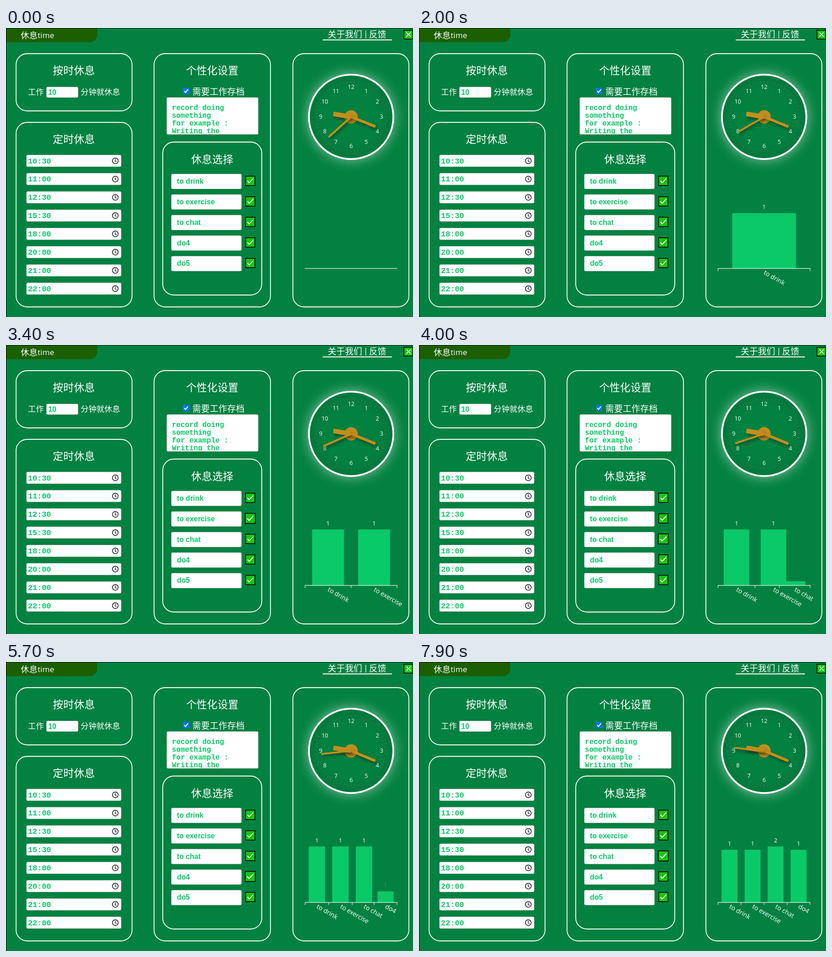
An HTML page with a canvas that plays this animation: 888 by 631 pixels, repeating every 8000 ms.

```html
<!DOCTYPE html>
<html lang="zh">
<head>
<meta charset="utf-8">
<title>休息time</title>
<style>
  html, body { margin: 0; width: 100%; height: 100%; overflow: hidden; background: #028140; }
  canvas { display: block; }
</style>
</head>
<body>
<canvas id="stage" width="888" height="631"></canvas>
<script>
const ctx = document.getElementById('stage').getContext('2d');
const LOOP = 8000, STEP = 100;
const BG = '#028140', WHITE = '#fff', MINT = '#0ac968', LIME = '#17c50f', GOLD = '#c18f1e';
const CJK = '"Noto Sans CJK SC", "Noto Sans CJK", sans-serif';
const LATIN = '"Open Sans", "Noto Sans", sans-serif';
const ARIAL = '"Liberation Sans", Arial, sans-serif';
const MONO = '"Liberation Mono", monospace';

const clamp = x => Math.max(0, Math.min(1, x));
const mix = (a, b, k) => a + (b - a) * k;
const cubicInOut = x => {
  x = clamp(x);
  return x < .5 ? 4 * x ** 3 : 1 - 4 * (1 - x) ** 3;
};

function text(str, x, y, font, color = WHITE, align = 'left', baseline = 'alphabetic') {
  ctx.font = font;
  ctx.fillStyle = color;
  ctx.textAlign = align;
  ctx.textBaseline = baseline;
  ctx.fillText(str, x, y);
}

function roundRect(x, y, w, h, r) {
  ctx.beginPath();
  ctx.roundRect(x, y, w, h, r);
}

function panel(x, y, right, bottom) {
  roundRect(x, y, right - x, bottom - y, 24);
  ctx.strokeStyle = WHITE;
  ctx.lineWidth = 1.8;
  ctx.stroke();
}

function field(x, y, w, h) {
  roundRect(x, y, w, h, 3);
  ctx.fillStyle = WHITE;
  ctx.fill();
  ctx.strokeStyle = 'rgba(110,130,120,.6)';
  ctx.lineWidth = 1;
  ctx.stroke();
}

function line(points, color, width) {
  ctx.beginPath();
  points.forEach(([x, y]) => ctx.lineTo(x, y));
  ctx.strokeStyle = color;
  ctx.lineWidth = width;
  ctx.stroke();
}

function disc(x, y, r, color) {
  ctx.beginPath();
  ctx.arc(x, y, r, 0, Math.PI * 2);
  ctx.fillStyle = color;
  ctx.fill();
}

function greenBox(x, y, size) {
  ctx.fillStyle = '#000';
  ctx.fillRect(x, y, size, size);
  ctx.fillStyle = LIME;
  ctx.fillRect(x + 1.6, y + 1.6, size - 3.2, size - 3.2);
}

function header() {
  ctx.fillStyle = BG;
  ctx.fillRect(0, 0, 888, 631);
  roundRect(0, 0, 199, 31, [0, 0, 16, 0]);
  ctx.fillStyle = '#1b5f00';
  ctx.fill();
  ctx.fillStyle = '#06180c';
  ctx.fillRect(0, 0, 888, 1);
  ctx.fillRect(0, 0, 1, 631);

  text('休息', 32, 22.5, `18.4px ${CJK}`);
  text('time', 69, 22, `17.2px ${LATIN}`);
  text('关于我们', 702, 20.5, `18.8px ${CJK}`);
  text('反馈', 792, 20.5, `18.8px ${CJK}`);
  line([[785, 6], [785, 23]], WHITE, 1.3);
  line([[691, 26], [842, 26]], WHITE, 1.8);

  greenBox(867.5, 4, 21);
  line([[873.5, 9.5], [883, 19]], WHITE, 1.7);
  line([[883, 9.5], [873.5, 19]], WHITE, 1.7);
}

function timeSettings() {
  panel(22, 56, 275, 181);
  text('按时休息', 148, 101, `23px ${CJK}`, WHITE, 'center');
  text('工作', 48, 146, `17.2px ${CJK}`);
  field(88, 128.5, 69.5, 23.5);
  text('10', 92, 145.5, `bold 16px ${ARIAL}`, MINT);
  text('分钟就休息', 163, 146, `17.2px ${CJK}`);

  panel(22, 206, 275, 609);
  text('定时休息', 148, 251, `23px ${CJK}`, WHITE, 'center');
  ['10:30', '11:00', '12:30', '15:30', '18:00', '20:00', '21:00', '22:00'].forEach((time, i) => {
    const y = 290 + i * 39.87;
    field(44.5, y - 13, 207, 26);
    text(time, 48, y + 5.5, `bold 16.8px ${MONO}`, MINT);
    ctx.beginPath();
    ctx.arc(238.5, y, 6.3, 0, Math.PI * 2);
    ctx.strokeStyle = '#111';
    ctx.lineWidth = 1.5;
    ctx.stroke();
    line([[238.3, y - 4], [238.3, y + .4], [241.2, y + 2.4]], '#111', 1.3);
  });
}

function personalSettings() {
  panel(323, 56, 577, 609);
  text('个性化设置', 450, 101, `22.8px ${CJK}`, WHITE, 'center');
  roundRect(386, 130.5, 14, 14, 2);
  ctx.fillStyle = '#0a75f5';
  ctx.fill();
  line([[388.8, 137.8], [391.7, 140.8], [397.2, 134]], WHITE, 2);
  text('需要工作存档', 406.5, 146, `19px ${CJK}`);

  field(350.5, 151.5, 200, 81);
  ctx.save();
  ctx.beginPath();
  ctx.rect(351, 152, 199, 79);
  ctx.clip();
  ['record doing', 'something', 'for example :', 'Writing the'].forEach((row, i) =>
    text(row, 362, 178.5 + i * 17, `bold 15.8px ${MONO}`, MINT));
  ctx.restore();

  panel(342, 249, 558, 583);
  text('休息选择', 450, 295, `23px ${CJK}`, WHITE, 'center');
}

const TASKS = ['to drink', 'to exercise', 'to chat', 'do4', 'do5'];
// [task, pointer enters, pointer leaves]
const HOVERS = [[0, 650, 1650], [1, 2100, 3430], [2, 3500, 4750], [3, 5000, 5950],
                [4, 6100, 6950], [3, 7050, 7250], [2, 7300, 9000]];

function hoverAmount(task, t) {
  return Math.max(...HOVERS.map(([id, on, off]) =>
    id === task ? Math.min(clamp((t - on) / 250), 1 - clamp((t - off) / 200)) : 0));
}

function taskList(t) {
  TASKS.forEach((task, i) => {
    const y = 334 + i * 44.85;
    field(360.5, y + 1 - 16.5, 153.5, 33);
    text(task, 373, y + 6, `bold 15.8px ${ARIAL}`, MINT);
    ctx.save();
    ctx.translate(533, y - .3);
    const scale = 1 + .08 * hoverAmount(i, t);
    ctx.scale(scale, scale);
    greenBox(-11, -11, 22);
    line([[-6.2, .2], [-2.3, 4.2], [6.2, -4.8]], WHITE, 1.9);
    ctx.restore();
  });
}

function hand(turn, length, width) {
  ctx.save();
  ctx.shadowColor = 'rgba(0,0,0,.45)';
  ctx.shadowBlur = 6;
  ctx.shadowOffsetX = 2;
  ctx.shadowOffsetY = 4;
  ctx.translate(753, 194);
  ctx.rotate(turn * Math.PI * 2);
  roundRect(-width / 2, -length, width, length, Math.min(2, width / 2));
  ctx.fillStyle = GOLD;
  ctx.fill();
  ctx.restore();
}

function clock(t) {
  const cx = 753, cy = 194;
  ctx.save();
  ctx.shadowColor = 'rgba(255,255,255,.5)';
  ctx.shadowBlur = 28;
  disc(cx, cy, 94, WHITE);
  ctx.restore();
  disc(cx, cy, 90.2, BG);
  const shade = ctx.createRadialGradient(cx, cy, 60, cx, cy, 90);
  shade.addColorStop(0, 'rgba(0,0,0,0)');
  shade.addColorStop(1, 'rgba(0,0,0,.07)');
  disc(cx, cy, 90.2, shade);

  for (let i = 0; i < 60; i++) {
    const a = i * Math.PI / 30, dx = Math.sin(a), dy = -Math.cos(a);
    line([[cx + dx * 73, cy + dy * 73], [cx + dx * 78.5, cy + dy * 78.5]], 'rgba(125,105,115,.65)', 1);
  }
  for (let n = 1; n <= 12; n++) {
    const a = n * Math.PI / 6;
    text(n, cx + Math.sin(a) * 66.3, 197.6 - Math.cos(a) * 64.5, `12.6px ${LATIN}`, WHITE, 'center');
  }

  const ticks = t < 800 ? 0 : Math.floor((t - 800) / 900) + 1;
  const seconds = (9 * 60 + 18) * 60 + 38 + ticks;
  disc(cx, cy, 14.5, GOLD);
  hand(seconds / 43200, 39.5, 10.5);
  hand(seconds / 3600, 57.5, 6);
  hand(seconds / 60, 66.5, 4.2);
}

const AXIS = { left: 652.5, right: 853.3, y: 525, height: 122.3 };
const CLICKS = [1230, 2430, 3760, 5370, 7760];

function chart(t) {
  const { left, right, y, height } = AXIS;
  const axisColor = 'rgba(235,245,240,.85)';
  const clicks = CLICKS.filter(at => t >= at).length;
  if (clicks) {
    const elapsed = t - CLICKS[clicks - 1];
    const move = cubicInOut(elapsed / 450), enter = cubicInOut(elapsed / 900);
    const count = Math.min(clicks, 4), before = clicks - 1;
    const band = n => (right - left) / n;
    const place = (i, offset) => {
      const at = n => left + band(n) * (i + offset);
      return i < before ? mix(at(before), at(count), move) : at(count);
    };

    for (let i = 0; i < count; i++) {
      const isNew = i >= before;
      const x = place(i, .5);
      const w = .692 * (isNew ? band(count) : mix(band(before), band(count), move));
      const value = clicks === 5 && i === 2 ? 2 : 1;
      const share = clicks === 5 ? mix(1, value / 2, move) : 1;
      const h = height * share * (isNew ? enter : 1);
      ctx.fillStyle = MINT;
      ctx.fillRect(x - w / 2, y - h, w, h);
      ctx.globalAlpha = isNew ? enter : 1;
      text(value, x, y - h - 8.8, `12.6px ${LATIN}`, WHITE, 'center');
      ctx.globalAlpha = 1;

      ctx.save();
      ctx.translate(x, 533.5);
      ctx.rotate(Math.PI / 6);
      text(TASKS[i], 0, 0, `14px ${LATIN}`, WHITE, 'left', 'middle');
      ctx.restore();
    }
    for (let i = 0; i <= count; i++) {
      const x = i === count ? right : place(i, 0);
      line([[x, y], [x, y + 5.5]], axisColor, 1.3);
    }
  }
  line([[left - .5, y], [right + .5, y]], axisColor, 1.5);
}

function draw(t) {
  header();
  timeSettings();
  personalSettings();
  taskList(t);
  panel(626, 56, 879, 609);
  clock(t);
  chart(t);
}

const start = performance.now();
function frame() {
  const t = Math.max(0, performance.now() - start) % LOOP;
  draw(Math.floor(t / STEP) * STEP);
  requestAnimationFrame(frame);
}
frame();
</script>
</body>
</html>
```
